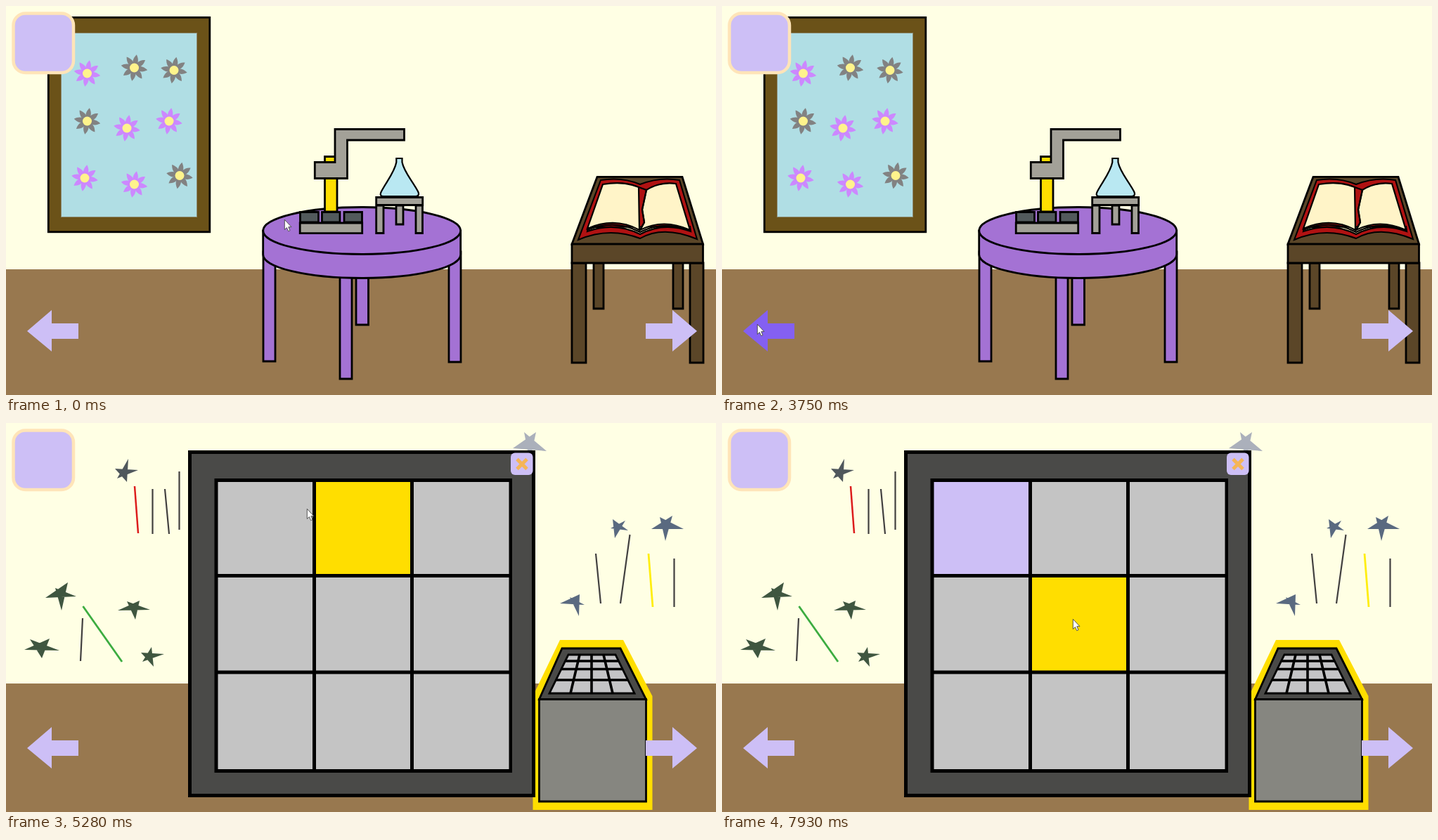
An HTML page that plays this animation: 1010x554 px, repeating every 7.99 s.

```html
<!DOCTYPE html>
<html lang="en">
<head>
<meta charset="utf-8">
<title>Puzzle rooms</title>
<style>
html, body { margin: 0; width: 100%; height: 100%; overflow: hidden; background: #ffffe4; }
svg { display: block; width: 100%; height: 100%; }
:root { --lilac: #cdbff6; --violet: #8460f2; --gold: #ffde00; --cell: #c4c4c4; }

.ink { stroke: #000; stroke-width: 2.8; }
.wood { fill: #5b4628; }
.steel { fill: #a3a198; }
.coal { fill: #525a5c; }
.purple { fill: #a472d4; }
.nav { fill: var(--lilac); }
.lines { stroke: #424040; stroke-width: 2.2; fill: none; }
.cells rect { fill: var(--cell); }

/* One shared 7990 ms clock; every switch is a hard cut. */
.anim { animation: 7990ms step-end infinite; }
#button { fill: var(--lilac); stroke: #ffe4b8; stroke-width: 4.5; animation-name: button; }
#bag { animation-name: bag; }
#back { animation-name: back; }
#lab { animation-name: lab; }
#gate { animation-name: gate; }
#glow { animation-name: glow; }
#board { animation-name: board; }
#c0 { animation-name: c0; }
#c1 { animation-name: c1; }
#c4 { animation-name: c4; }
#click { fill: rgba(216, 210, 0, .55); animation-name: click; }
#cursor { animation: cursor 7990ms linear infinite; }

@keyframes button {
  0%, 34.41% { fill: var(--lilac); stroke: #ffe4b8; }
  18.39% { fill: var(--violet); stroke: #f2b660; }
}
@keyframes bag { 0%, 30.16% { visibility: hidden; } 22.52% { visibility: visible; } }
@keyframes back { 0%, 53.5% { fill: var(--lilac); } 43.9% { fill: var(--violet); } }
@keyframes lab { 0% { visibility: visible; } 47.93% { visibility: hidden; } }
@keyframes gate { 0% { visibility: hidden; } 47.93% { visibility: visible; } }
@keyframes glow { 0% { visibility: hidden; } 58.5% { visibility: visible; } }
@keyframes board { 0% { visibility: hidden; } 61.07% { visibility: visible; } }
@keyframes c0 {
  0%, 75.09% { fill: var(--cell); }
  66.95%, 90.73% { fill: var(--gold); }
  93.36% { fill: var(--lilac); }
}
@keyframes c1 {
  0%, 66.95%, 90.73%, 97.49% { fill: var(--cell); }
  65.2%, 75.09%, 95.86% { fill: var(--gold); }
}
@keyframes c4 { 0% { fill: var(--cell); } 97.49% { fill: var(--gold); } }
@keyframes click {
  0%, 22.52%, 30.16%, 47.93%, 61.07%, 94.24% { visibility: hidden; }
  20.9%, 29.16%, 46.95%, 60.32%, 93.36% { visibility: visible; }
  46.95% { visibility: hidden; }
}
@keyframes cursor {
  0%, 4.38% { transform: translate(396px, 304px); }
  6.26%, 9.13% { transform: translate(218px, 372px); }
  10.6% { transform: translate(190px, 431px); }
  14.76%, 18.39% { transform: translate(98px, 52px); }
  19.5%, 32.66% { transform: translate(79px, 52px); }
  36.3% { transform: translate(103px, 200px); }
  41.8%, 42.67% { transform: translate(90px, 430px); }
  45.06%, 52.69% { transform: translate(50px, 453px); }
  59.7% { transform: translate(775px, 353px); animation-timing-function: step-end; }
  65.2% { transform: translate(505px, 190px); animation-timing-function: step-end; }
  66.07% { transform: translate(428px, 122px); animation-timing-function: step-end; }
  66.95%, 70.46% { transform: translate(415px, 118px); }
  79.97%, 81.47% { transform: translate(465px, 141px); }
  89.86% { transform: translate(440px, 146px); }
  90.73% { transform: translate(425px, 148px); }
  92.6%, 94.24% { transform: translate(380px, 150px); }
  95.86% { transform: translate(445px, 190px); }
  99.24%, 100% { transform: translate(499px, 279px); }
}
</style>
</head>
<body>
<svg viewBox="0 0 1010 554" preserveAspectRatio="none">
  <defs>
    <path id="petal" d="M0 0C-6-8-3.5-14 0-19C3.5-14 6-8 0 0"/>
    <g id="flower">
      <g id="pair"><use href="#petal" transform="rotate(10)"/><use href="#petal" transform="rotate(55)"/></g>
      <use href="#pair" transform="rotate(90)"/>
      <use href="#pair" transform="rotate(180)"/>
      <use href="#pair" transform="rotate(270)"/>
      <circle r="6.5" fill="#fff38c"/>
    </g>
    <path id="arrow" d="M0 0L35-30V-11H73V11H35V29Z"/>
    <radialGradient id="swirl">
      <stop offset="0" stop-color="#2c6892"/>
      <stop offset=".24" stop-color="#2b4079"/>
      <stop offset=".48" stop-color="#3a82a8"/>
      <stop offset=".72" stop-color="#365799"/>
      <stop offset="1" stop-color="#2fbaf6"/>
    </radialGradient>
  </defs>

  <rect width="1010" height="554" fill="#ffffe4"/>

  <g id="lab" class="anim">
    <rect y="375" width="1010" height="179" fill="#98784f"/>

    <rect class="ink" x="60.3" y="16.3" width="229.5" height="305.5" fill="#6b5218"/>
    <rect x="78.5" y="38.5" width="193" height="262" fill="#b0dee4" stroke="#8b8a70"/>
    <g fill="#cc88ff">
      <use href="#flower" x="115.5" y="96"/><use href="#flower" x="172" y="174"/>
      <use href="#flower" x="232" y="164"/><use href="#flower" x="112" y="245"/>
      <use href="#flower" x="182.5" y="254"/>
    </g>
    <g fill="#828282">
      <use href="#flower" x="182.5" y="88"/><use href="#flower" x="239" y="91.5"/>
      <use href="#flower" x="115.5" y="164"/><use href="#flower" x="247" y="241.5"/>
    </g>

    <g class="ink purple">
      <path d="M498 360H515.5V454H498ZM366 350H383V506H366ZM630 350H647V507H630ZM475 360H492V531H475Z"/>
      <path d="M365.7 320V354A140.5 33.5 0 0 0 646.7 354V320Z"/>
      <ellipse cx="506.2" cy="320" rx="140.5" ry="33.5"/>
    </g>

    <g class="ink">
      <path fill="#ffde00" d="M453.5 214.5H471V293H453.5Z"/>
      <path class="steel" d="M439.3 222.5H468V175.5H566.5V191H485.5V245.5H439.3Z"/>
      <path class="coal" d="M418.5 293.5H444.5V308H418.5ZM449.5 293.5H475V308H449.5ZM481 293.5H506.5V308H481Z"/>
      <path class="steel" d="M418.2 309H506.7V323.7H418.2Z"/>
      <path class="steel" d="M555 284H565V311H555ZM526.7 284H537V323.5H526.7ZM583 284H592.5V323.5H583ZM526.7 272.5H592.7V283.5H526.7Z"/>
      <path fill="#b9e8f2" stroke-width="2.2" d="M555.3 217H563.5V222.5C566 236 578 249 586 264C588 268 587 271 583 271H537C532 271 532 268 534 264C542 249 553 236 555.3 222.5Z"/>
    </g>

    <g class="ink wood">
      <path d="M836 366H850V431H836ZM949 366H963V431H949ZM805 366H825V508H805ZM973 366H992V508H973Z"/>
      <path d="M841 243.3H962L991.5 339H805ZM805 339H991.5V366H805Z"/>
      <path fill="#b01212" stroke-width="2" d="M846 248Q876 243 902 254Q930 243 958 248L983 332Q935 312 902 331Q858 314 814 333Z"/>
      <g fill="#fff4c8" stroke-width="2.2">
        <path d="M828 315L827 321Q866 307 902 325Q936 307 974 321L973 314Z"/>
        <path d="M849 254Q879 249 900 258L901 319Q866 300 827 317Z"/>
        <path d="M911 262Q930 250 953 253L973 319Q935 302 902 319L908 308L905 290Z"/>
        <path fill="none" d="M827 319Q866 303 902 322Q936 305 973 320M900 258L911 262L905 290L908 308L902 319"/>
      </g>
    </g>
  </g>

  <g id="gate" class="anim">
    <rect y="371" width="1010" height="183" fill="#98784f"/>
    <ellipse class="ink" cx="506" cy="285.7" rx="123.2" ry="218.7" fill="url(#swirl)"/>

    <!-- Five tips joined every second one make each star. -->
    <path fill="#4f575c" d="M174 51L172 84L155 65L188 67L158 79Z"/>
    <path fill="#3f5640" d="M88 227L79 267L70 235L100 247L56 249Z"/>
    <path fill="#3f5640" d="M172 254L205 266L159 267L190 253L184 280Z"/>
    <path fill="#3f5640" d="M34 308L76 324L26 323L62 307L51 335Z"/>
    <path fill="#3f5640" d="M207 319L210 347L192 327L225 329L194 340Z"/>
    <path fill="#abb0bb" d="M754 13L745 55L737 13L769 40L721 36Z"/>
    <path fill="#abb0bb" d="M655 152L649 194L636 167L674 173L633 180Z"/>
    <path fill="#5a6a80" d="M863 137L885 153L860 150L881 139L866 164Z"/>
    <path fill="#5a6a80" d="M948 132L938 168L930 134L964 151L918 151Z"/>
    <path fill="#5a6a80" d="M816 244L815 275L802 248L823 259L788 257Z"/>

    <g class="lines">
      <path d="M208.5 94V158M226 94L232 158M246.5 69V152M274.5 93L263.5 167M288 106L295 175"/>
      <path d="M694.5 69L662 129M839 186L846 257M887.5 159L874 257M950.5 193V262M109 278L106 339"/>
      <path stroke="#dc1c1c" stroke-width="2.5" d="M183 90L188 157"/>
      <path stroke="#7448a0" stroke-width="2.8" d="M726 64L702 148"/>
      <path stroke="#ffee10" stroke-width="2.8" d="M914 186L920 262"/>
      <path stroke="#3cac40" stroke-width="2.8" d="M109.5 261L165 340"/>
    </g>

    <path id="glow" class="anim" fill="#ffde00" d="M788 309H878L919.5 389V551H749.5V389Z"/>
    <g class="ink">
      <path fill="#868680" d="M758.5 393.5H910.5V539H758.5Z"/>
      <path fill="#4a4a48" d="M791 321H874L910.5 393.5H758.5Z"/>
      <path fill="#c4c4c6" d="M800 330H867L894 385H773Z"/>
      <path fill="none" stroke-width="3.6" d="M816 330L803 385M833 330V385M850 330L863 385M795.6 339H871.4M790 350.5H877M782 366H884.5"/>
    </g>
  </g>

  <use id="back" class="nav anim" href="#arrow" x="30" y="463"/>
  <use class="nav" href="#arrow" transform="translate(983 463) scale(-1 1)"/>
  <rect id="button" class="anim" x="10.5" y="10.5" width="85.5" height="84.5" rx="17"/>

  <rect id="bag" class="anim" x="211.5" y="42.5" width="587" height="469" rx="17" fill="#cdbff6" stroke="#ffe4b8" stroke-width="5"/>

  <g id="board" class="anim">
    <rect x="261.5" y="41.5" width="489" height="489" fill="#4a4a48" stroke="#000" stroke-width="5"/>
    <rect x="296.5" y="79" width="423.5" height="419"/>
    <g class="cells">
      <rect id="c0" class="anim" x="301.5" y="84" width="134.5" height="131"/>
      <rect id="c1" class="anim" x="441" y="84" width="134" height="131"/>
      <rect x="580" y="84" width="135.5" height="131"/>
      <rect x="301.5" y="220" width="134.5" height="132.5"/>
      <rect id="c4" class="anim" x="441" y="220" width="134" height="132.5"/>
      <rect x="580" y="220" width="135.5" height="132.5"/>
      <rect x="301.5" y="357.5" width="134.5" height="135.5"/>
      <rect x="441" y="357.5" width="134" height="135.5"/>
      <rect x="580" y="357.5" width="135.5" height="135.5"/>
    </g>
    <rect class="nav" x="718" y="42.5" width="31.5" height="31.5" rx="6"/>
    <path stroke="#f5b556" stroke-width="5" d="M727 51.5L741 65.5M741 51.5L727 65.5"/>
  </g>

  <g id="cursor">
    <circle id="click" class="anim" r="10"/>
    <path fill="#fff" stroke="#444" stroke-width=".9" d="M.3.3V14.5L3.4 11.6L5.7 16.7L8 15.7L5.8 10.7H10Z"/>
  </g>
</svg>
</body>
</html>
```
